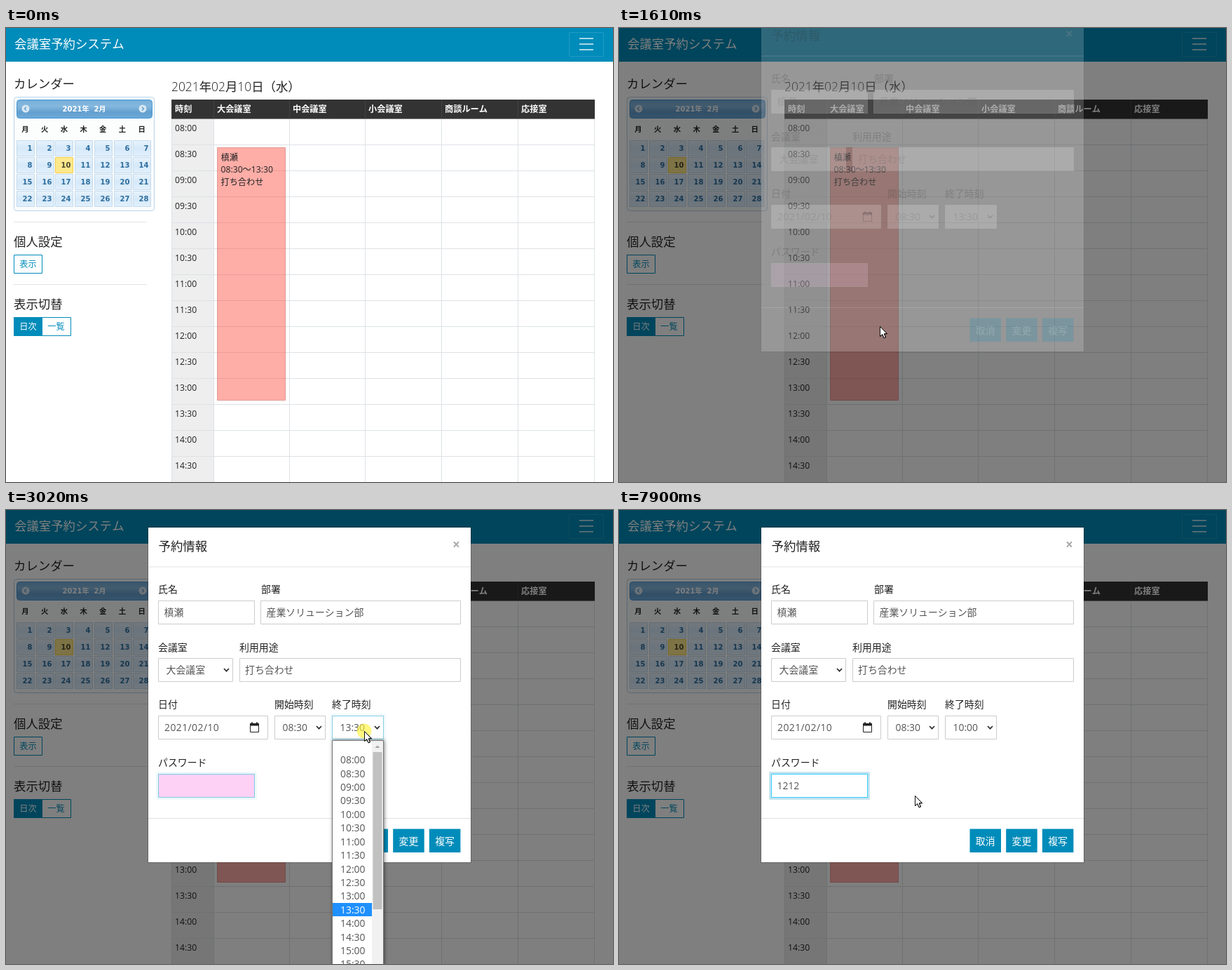
An HTML page with a canvas that plays this animation: 866x647 px, repeating every 7990 ms.

```html
<!DOCTYPE html>
<html lang="ja">
<head>
<meta charset="utf-8">
<title>会議室予約システム</title>
<style>
html, body { margin: 0; width: 100%; height: 100%; overflow: hidden; background: #fff; }
canvas { display: block; width: 866px; height: 647px; }
</style>
</head>
<body>
<canvas id="stage" width="866" height="647"></canvas>
<script>
const ctx = document.getElementById('stage').getContext('2d');
const W = 866, H = 647, LOOP = 7990;
const SANS = '"Open Sans", "Noto Sans CJK JP", sans-serif';
const BOLD_UI = '"DejaVu Sans", "Noto Sans CJK JP", sans-serif';
const BLUE = '#008cba', NAME = '槙瀬', PURPOSE = '打ち合わせ';
const SMALL = 12.2, BODY = 13.9, LARGE = 17.4;

// Screen refreshes: [first, last, count]
const RUNS = [
  [0, 0, 1], [290, 1080, 11], [1380, 2160, 11], [2240, 2630, 6], [2940, 3100, 3],
  [3400, 4180, 11], [4260, 4260, 1], [4720, 4720, 1], [4870, 5500, 9], [5650, 5820, 3],
  [5970, 5970, 1], [6200, 6200, 1], [6430, 6430, 1], [6740, 6740, 1], [7040, 7040, 1],
  [7270, 7270, 1], [7590, 7900, 5]
];
const TICKS = RUNS.flatMap(([a, b, n]) =>
  Array.from({ length: n }, (_, i) => Math.round((a + (b - a) * i / Math.max(1, n - 1)) / 10) * 10));

// Pointer moves: [start, end, x, y]
const MOVES = [
  [290, 1060, 372, 425], [1990, 2170, 420, 383], [2230, 2460, 530, 325], [2470, 2630, 511, 315],
  [3380, 4250, 502, 432], [4940, 5500, 306, 407], [7580, 7890, 422, 407]
];
const CLICKS = [[1380, 1460], [2940, 3100], [4720, 4870], [5650, 5820]];
const KEYS = [6430, 6740, 7040, 7270];
const FOCUS = { pass1: 1920, end: 2950, pass2: 5660 };

const clamp = v => Math.min(1, Math.max(0, v));
const ramp = (t, start, len) => clamp((t - start) / len);
const within = (t, a, b) => t >= a && t < b;
const smooth = u => u < .5 ? 2 * u * u : 1 - 2 * (1 - u) * (1 - u);

function easeOut(u) {
  let lo = 0, hi = 1;
  for (let i = 0; i < 20; i++) {
    const s = (lo + hi) / 2;
    if (1.74 * s * s - .74 * s * s * s < u) lo = s; else hi = s;
  }
  return 3 * lo * lo - 2 * lo * lo * lo;
}

function pointer(t) {
  let x = 731, y = 616;
  for (const [a, b, tx, ty] of MOVES) {
    const u = smooth(ramp(t, a, b - a));
    x += (tx - x) * u;
    y += (ty - y) * u;
  }
  return { x, y };
}

function rect(x, y, w, h, fill) {
  ctx.fillStyle = fill;
  ctx.fillRect(x, y, w, h);
}

function box(x, y, w, h, fill, stroke, r = 0) {
  ctx.beginPath();
  ctx.roundRect(x + .5, y + .5, w - 1, h - 1, r);
  if (fill) { ctx.fillStyle = fill; ctx.fill(); }
  if (stroke) { ctx.strokeStyle = stroke; ctx.lineWidth = 1; ctx.stroke(); }
}

function poly(points, stroke, width, fill) {
  ctx.beginPath();
  points.forEach(([x, y]) => ctx.lineTo(x, y));
  if (fill) { ctx.closePath(); ctx.fillStyle = fill; ctx.fill(); }
  if (stroke) { ctx.strokeStyle = stroke; ctx.lineWidth = width; ctx.stroke(); }
}

function disc(x, y, r, fill) {
  ctx.beginPath();
  ctx.arc(x, y, r, 0, 7);
  ctx.fillStyle = fill;
  ctx.fill();
}

// y is the vertical middle of the glyphs
function text(s, x, y, size, color, { weight = 400, align = 'left', family = SANS } = {}) {
  ctx.font = `${weight} ${size}px ${family}`;
  ctx.textAlign = align;
  ctx.fillStyle = color;
  ctx.fillText(s, x, y + size * .37);
  return ctx.measureText(s).width;
}

function vertical(y0, y1, ...stops) {
  const g = ctx.createLinearGradient(0, y0, 0, y1);
  stops.forEach((c, i) => g.addColorStop(i / (stops.length - 1), c));
  return g;
}

const clock = i => `${String(8 + (i >> 1)).padStart(2, '0')}:${i % 2 ? '30' : '00'}`;

function drawNav() {
  rect(0, 0, W, 48, BLUE);
  text('会議室予約システム', 12, 23, LARGE, '#fff');
  box(803, 6, 50, 35, null, 'rgba(255,255,255,.12)', 1);
  for (const y of [15, 23, 31]) rect(818, y - 1, 20, 1.8, 'rgba(255,255,255,.72)');
}

function drawCalendar() {
  box(11, 98, 201, 163, '#fcfdfd', '#b9d4e8', 4);
  box(15, 102, 194, 27, vertical(102, 129, '#74add8', '#86b8de', '#639fcf', '#6fabd8'), '#4297d7', 4);
  for (const [x, d] of [[28, -1], [195, 1]]) {
    disc(x, 115, 5.5, '#d8e7f3');
    poly([[x - d, 112.5], [x + 1.5 * d, 115], [x - d, 117.5]], '#5c9ccc', 1.4);
  }
  const bold = { weight: 700, family: BOLD_UI };
  text('2021年  2月', 111.5, 115, 10, '#fff', { ...bold, align: 'center' });
  [...'月火水木金土日'].forEach((d, i) =>
    text(d, 27.5 + i * 27.7, 144, 10.4, '#222', { ...bold, align: 'center' }));
  for (let i = 0; i < 28; i++) {
    const x = Math.round(15 + i % 7 * 27.7), y = 160 + 24 * Math.floor(i / 7);
    const today = i === 9;
    box(x, y, 26, 23, today ? '#fde88c' : vertical(y, y + 23, '#e8f3fc', '#d6e9f9', '#e2f0fc'),
      today ? '#f2cf4a' : '#c5dbec');
    text(i + 1, x + 22.5, y + 11.5, 10, today ? '#4a4630' : '#2e6e9e', { ...bold, align: 'right' });
  }
}

function drawSide(t) {
  text('カレンダー', 11, 80, LARGE, '#222');
  drawCalendar();
  const right = t >= 1444 ? 205 : 201;
  for (const y of [276, 365]) rect(11, y, right - 11, 1, 'rgba(0,0,0,.11)');
  const mid = { align: 'center' };
  text('個人設定', 11, 305, LARGE, '#222');
  box(11, 323, 41, 27, null, BLUE);
  text('表示', 31.5, 336.5, SMALL, BLUE, mid);
  text('表示切替', 11, 394, LARGE, '#222');
  box(11, 412, 82, 27, null, BLUE);
  rect(11, 412, 41, 27, BLUE);
  text('日次', 31.5, 425.5, SMALL, '#fff', mid);
  text('一覧', 71.5, 425.5, SMALL, BLUE, mid);
}

function drawTable() {
  let x = 236;
  for (const part of '2021年02月10日（水）'.match(/\d+|\D+/g))
    x += text(part, x, 84, LARGE, '#222', { weight: /\d/.test(part) ? 300 : 400 });

  rect(236, 129, 60, H - 129, '#eee');
  for (let i = 0; i < 14; i++) {
    rect(236, 129 + 37 * i, 604, 1, '#dee2e6');
    text(clock(i), 241, 142.5 + 37 * i, SMALL, '#222');
  }
  const cols = [236, 296, 404, 512, 621, 730, 839];
  for (const c of cols) rect(c, 129, 1, H - 129, '#dee2e6');
  rect(236, 102, 604, 27.5, '#333');
  ['時刻', '大会議室', '中会議室', '小会議室', '商談ルーム', '応接室'].forEach((s, i) => {
    rect(cols[i], 102, 1, 27, '#414141');
    text(s, cols[i] + 5, 115, SMALL, '#fff', { weight: 700 });
  });

  box(301, 170, 98, 361, 'rgba(255,92,80,.5)', 'rgba(190,80,75,.45)');
  [NAME, '08:30～13:30', PURPOSE].forEach((s, i) => text(s, 306.5, 184.5 + 17.4 * i, SMALL, '#222'));
}

function drawTip(t) {
  const a = ramp(t, 860, 150) * (1 - ramp(t, 1460, 140));
  if (!a) return;
  ctx.save();
  ctx.globalAlpha = a;
  const fill = 'rgba(0,0,0,.88)';
  rect(305, 104, 89, 60, fill);
  poly([[344, 164], [356, 164], [350, 169.5]], null, 0, fill);
  [NAME, '08:30～13:30', PURPOSE].forEach((s, i) =>
    text(s, 349.5, 116.5 + 17.4 * i, SMALL, '#fff', { align: 'center' }));
  ctx.restore();
}

function field(x, y, w, value, pad, ring = 0, fill = '#fff') {
  box(x, y, w, 34, fill, '#ccc');
  if (ring) {
    ctx.strokeStyle = `rgba(0,140,186,${.25 * ring * ring})`;
    ctx.lineWidth = 2.8;
    ctx.strokeRect(x - 1.4, y - 1.4, w + 2.8, 36.8);
    box(x, y, w, 34, null, `rgba(59,206,255,${ring})`);
  }
  text(value, x + pad, y + 17, BODY, '#555');
}

function select(x, y, w, value, ring) {
  field(x, y, w, value, 11.5, ring);
  const cx = x + w - 9.5, cy = y + 17;
  poly([[cx - 3.5, cy - 2], [cx, cy + 1.7], [cx + 3.5, cy - 2]], '#333', 1.8);
}

function caretOn(t) {
  if (!within(t, FOCUS.pass1, FOCUS.end) && t < FOCUS.pass2) return false;
  const reset = [FOCUS.pass1, FOCUS.pass2, ...KEYS].filter(k => k <= t).pop();
  return (t - reset) % 1000 < 500;
}

function drawModal(t) {
  const alpha = ramp(t, 1582, 150);
  if (!alpha) return;
  const slide = easeOut(ramp(t, 1600, 300));
  const passRing = ramp(t, FOCUS.pass1, 150) - ramp(t, FOCUS.end, 150) + ramp(t, FOCUS.pass2, 150);
  const endRing = ramp(t, FOCUS.end, 150) - ramp(t, FOCUS.pass2, 150);
  const focused = within(t, FOCUS.pass1, FOCUS.end) || t >= FOCUS.pass2;
  const typed = '1212'.slice(0, KEYS.filter(k => k <= t).length);

  ctx.save();
  ctx.globalAlpha = alpha;
  ctx.translate(0, Math.round(-43.5 * (1 - slide)));
  const left = slide < 1 ? 203 : 202;
  box(left - 1, 24, 462, 479, null, 'rgba(0,0,0,.2)');
  rect(left, 25, 460, 477, '#fff');
  rect(left, 80.5, 460, 1, '#dee2e6');
  rect(left, 439, 460, 1, '#dee2e6');
  text('予約情報', 217.5, 52, LARGE, '#222');
  text('×', 642.5, 49, 19, '#aaa', { weight: 700, align: 'center' });

  [['氏名', 217, 113], ['部署', 364, 113], ['会議室', 217, 196], ['利用用途', 333, 196],
   ['日付', 217, 277], ['開始時刻', 383, 277], ['終了時刻', 465, 277], ['パスワード', 217, 359.5]]
    .forEach(([s, x, y]) => text(s, x, y, BODY, '#222'));

  field(217, 129, 138, NAME, 8.5);
  field(363, 129, 286, '産業ソリューション部', 8.5);
  select(217, 211, 107, '大会議室');
  field(333, 211, 316, PURPOSE, 8);
  ctx.letterSpacing = '.45px';
  field(217, 293, 157, '2021/02/10', 9);
  ctx.letterSpacing = '0px';
  box(348, 304, 13, 13, null, '#222');
  rect(348, 304, 13, 3.5, '#222');
  rect(350, 302.5, 2, 2, '#222');
  rect(357, 302.5, 2, 2, '#222');
  select(383, 293, 73, '08:30');
  select(465, 293, 74, t >= 4870 ? '10:00' : '13:30', endRing);
  field(217, 376, 138, typed, 8.5, passRing, focused ? '#fff' : '#fdd0f5');
  if (caretOn(t)) rect(226 + typed.length * 7.95, 383, 1, 19, '#222');

  ['取消', '変更', '複写'].forEach((s, i) => {
    const x = 500.5 + 51.7 * i;
    rect(x, 454.5, 44.5, 33.5, BLUE);
    text(s, x + 22.2, 471.5, BODY, '#fff', { weight: 500, align: 'center' });
  });
  ctx.restore();
}

function drawList(t, y) {
  if (!within(t, FOCUS.end, 4870)) return;
  const row = 19.42, top = 346.3;
  const picked = y > top ? Math.floor((y - top) / row) : 11;
  ctx.save();
  ctx.shadowColor = 'rgba(0,0,0,.5)';
  ctx.shadowBlur = 5;
  ctx.shadowOffsetX = 1;
  rect(465, 328, 74, H, '#767676');
  ctx.restore();
  rect(466, 329, 72, H, '#fff');
  for (let i = 0; i < 16; i++) {
    if (i === picked) rect(466, Math.round(top + row * i), 56, 19, '#1e90ff');
    text(clock(i), 477, 356 + row * i, BODY, i === picked ? '#fff' : '#555');
  }
  rect(522, 329, 16, H, '#f1f1f1');
  rect(523.5, 345, 13, 224, '#c1c1c1');
  poly([[526.5, 339], [530, 335.5], [533.5, 339]], null, 0, '#a3a3a3');
}

function drawPointer(t, { x, y }) {
  if (t < 290 || within(t, 5970, 7590)) return;
  if (CLICKS.some(([a, b]) => within(t, a, b))) disc(x, y, 10.5, 'rgba(255,242,50,.62)');
  if (t > 4870 && x < 355 && within(y, 376, 410)) {
    rect(x - .5, y - 7, 1, 14, '#222');
    rect(x - 3, y - 8, 6, 1, '#222');
    rect(x - 3, y + 7, 6, 1, '#222');
    return;
  }
  ctx.save();
  ctx.translate(Math.round(x) + .5, Math.round(y) + .5);
  poly([[0, 0], [0, 14], [3.2, 11.2], [5.6, 16.3], [8, 15.3], [5.8, 10.4], [10, 10.2]], '#111', 1, '#fff');
  ctx.stroke();
  ctx.restore();
}

function draw(now) {
  const time = now % LOOP;
  const t = TICKS.filter(k => k <= time).pop();
  const p = pointer(t);
  rect(0, 0, W, H, '#fff');
  drawNav();
  drawSide(t);
  drawTable();
  drawTip(t);
  rect(0, 0, W, H, `rgba(0,0,0,${.5 * ramp(t, 1444, 150)})`);
  drawModal(t);
  drawList(t, p.y);
  drawPointer(t, p);
}

const began = performance.now();
function loop() {
  draw(performance.now() - began);
  requestAnimationFrame(loop);
}
loop();
</script>
</body>
</html>
```
